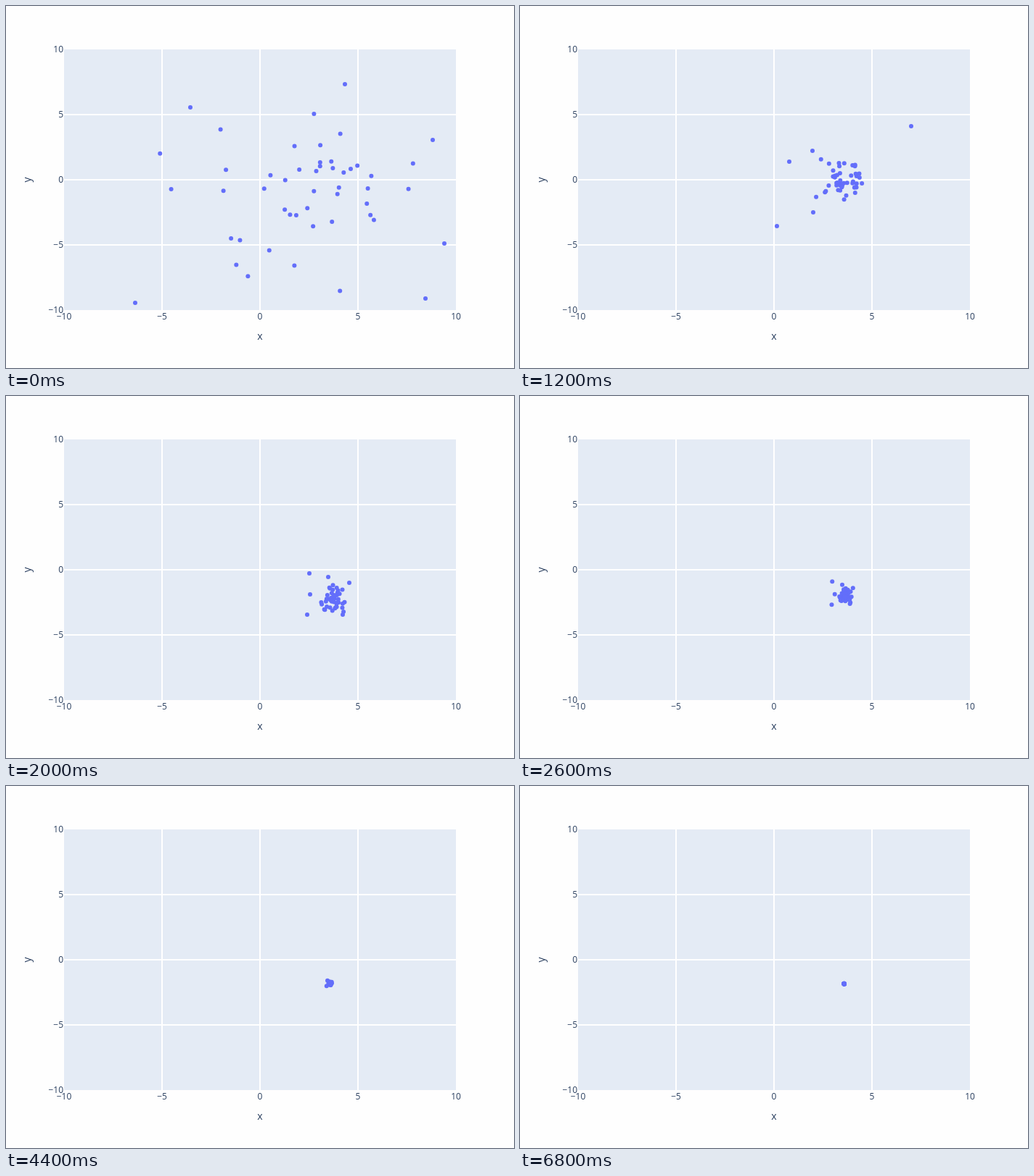
These frames come from a looping animation (700 by 500 pixels, 7 s). An HTML page:

```html
<!DOCTYPE html>
<html lang="en">
<head>
<meta charset="utf-8">
<title>Swarm scatter</title>
<style>
  html, body { margin: 0; width: 100%; height: 100%; overflow: hidden; background: #fefefe; }
  svg { display: block; }
  text { font-family: "Open Sans", sans-serif; font-size: 12px; fill: #2a3f5f; }
  .title { font-size: 14px; text-anchor: middle; }
</style>
</head>
<body>
<svg width="700" height="500" viewBox="0 0 700 500">
  <rect width="700" height="500" fill="#fefefe"/>
  <rect x="80" y="60" width="540" height="360" fill="#e4ebf5"/>
  <path d="M215 60V420M350 60V420M485 60V420M80 150H620M80 240H620M80 330H620" stroke="#fff" stroke-width="2"/>
  <g id="dots" fill="#636efa"></g>
  <g id="ticks"></g>
  <text class="title" x="350" y="460.5">x</text>
  <text class="title" transform="translate(34 240) rotate(-90)">y</text>
</svg>
<script>
const STEP = 200, STEPS = 35, COUNT = 50;
const CENTER = [446.6, 273.2];
const NS = "http://www.w3.org/2000/svg";

function add(parent, tag, attrs, text) {
  const el = document.createElementNS(NS, tag);
  for (const k in attrs) el.setAttribute(k, attrs[k]);
  if (text) el.textContent = text;
  return document.getElementById(parent).appendChild(el);
}

for (let v = -10; v <= 10; v += 5) {
  const label = String(v).replace("-", "\u2212");
  add("ticks", "text", { x: 350 + v * 27, y: 433, "text-anchor": "middle" }, label);
  add("ticks", "text", { x: 79, y: 244.2 - v * 18, "text-anchor": "end" }, label);
}

let seed = 11;
function rand() {
  seed = (seed * 16807) % 2147483647;
  return seed / 2147483647;
}
// Bounded bell curve with unit deviation.
const bell = () => (rand() + rand() - 1) * Math.sqrt(6);

// A random swarm around (cx, cy) with a few fixed strays.
function cloud(cx, cy, sx, sy, ...strays) {
  while (strays.length < COUNT) strays.push([cx + bell() * sx, cy + bell() * sy]);
  return strays;
}

const keys = [
  { at: 0, pts: cloud(404, 262, 80, 58,
    [178, 410], [254, 140], [467, 108], [604, 328], [578, 404], [588, 185]) },
  { at: 3, ease: 0.6, pts: cloud(452, 256, 42, 29,
    [350, 201], [360, 253], [540, 183], [572, 334], [545, 325]) },
  { at: 6, ease: 0.6, pts: cloud(441, 243, 15, 14,
    [539, 166], [371, 215], [354, 304], [403, 200], [404, 285]) },
  { at: 10, ease: 0.5, swing: 12, pts: cloud(450, 281, 10, 9,
    [418, 245], [444, 250], [473, 258], [419, 274], [415, 302], [464, 302]) },
  { at: 18, ease: 0.15, pts: cloud(446.6, 272, 1.7, 2, [438.4, 263.8], [439.2, 279.2]) },
  { at: 26, ease: 0.3, pts: cloud(446.6, 272.9, 0.8, 0.6, [443.2, 274.5], [448.6, 271.2]) },
  { at: 34, ease: 0.3, pts: cloud(...CENTER, 0.2, 0.2) }
];

const dist = (a, b) => Math.hypot(a[0] - b[0], a[1] - b[1]);
const mix = (a, b, k) => a + (b - a) * k;

// Pair each particle with the free spot nearest to its pulled-in position, outermost first.
function pair(from, to) {
  const free = to.slice(), out = [];
  const order = from.map((_, i) => i).sort((a, b) => dist(from[b], CENTER) - dist(from[a], CENTER));
  for (const i of order) {
    const goal = from[i].map((v, d) => mix(v, CENTER[d], 0.45));
    free.sort((a, b) => dist(a, goal) - dist(b, goal));
    out[i] = free.shift();
  }
  return out;
}
for (let k = 1; k < keys.length; k++) keys[k].pts = pair(keys[k - 1].pts, keys[k].pts);

const dots = keys[0].pts.map(() => add("dots", "circle", { r: 3 }));

function draw(ms) {
  const n = Math.floor(ms / STEP) % STEPS;
  const k = Math.max(1, keys.findIndex(key => n <= key.at));
  const a = keys[k - 1], b = keys[k];
  const u = (n - a.at) / (b.at - a.at);
  const w = (1 - b.ease ** u) / (1 - b.ease);
  const dy = (b.swing || 0) * Math.sin(Math.PI * u);
  dots.forEach((dot, i) => {
    const p = a.pts[i], q = b.pts[i];
    dot.setAttribute("cx", mix(p[0], q[0], w).toFixed(2));
    dot.setAttribute("cy", (mix(p[1], q[1], w) + dy).toFixed(2));
  });
}

const start = performance.now();
function tick() {
  draw(performance.now() - start);
  requestAnimationFrame(tick);
}
tick();
</script>
</body>
</html>
```
